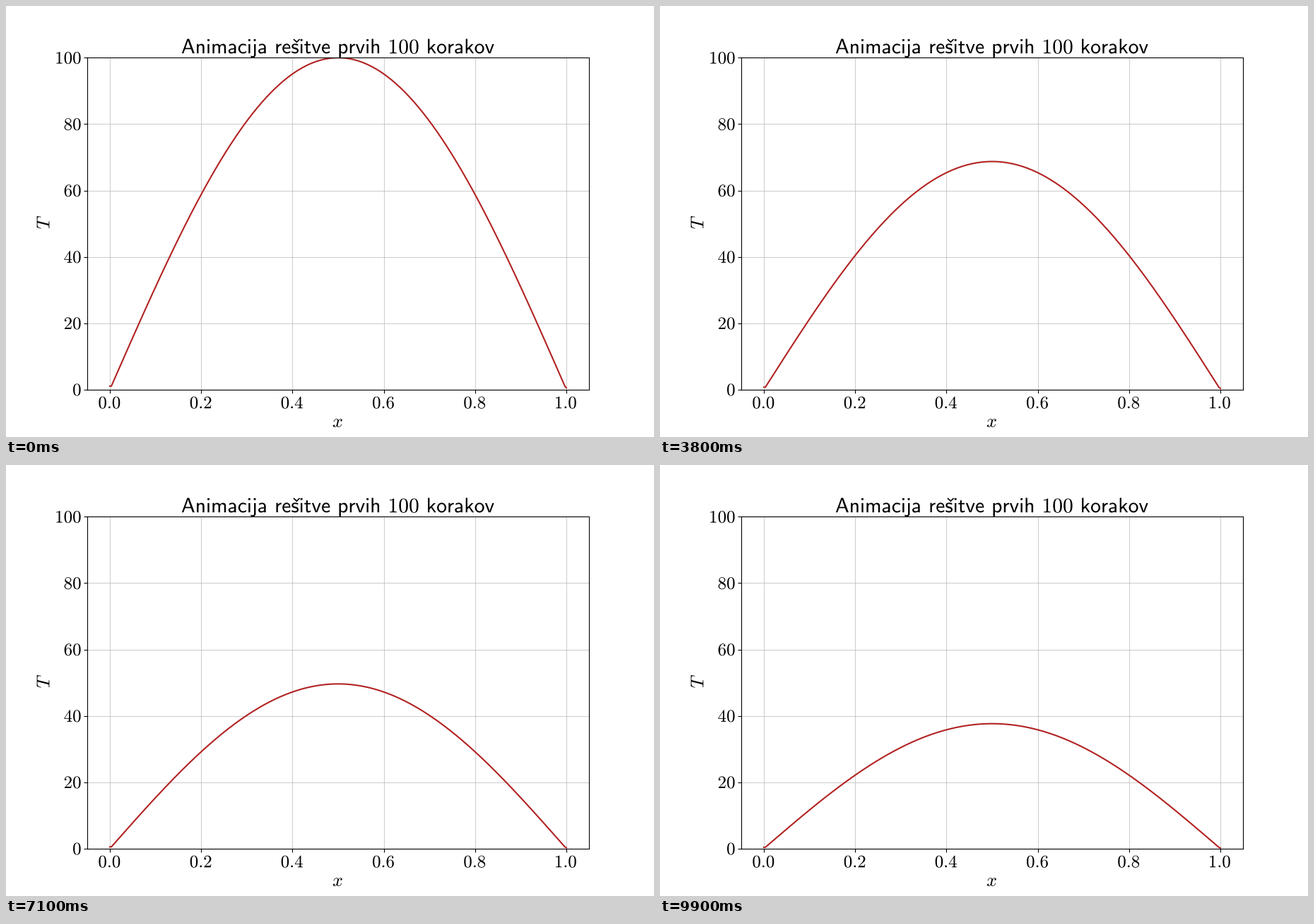
A matplotlib script for the animation above (10 s loop, 917 by 611 pixels).

```python
import numpy as np
import matplotlib.pyplot as plt
from matplotlib.animation import FuncAnimation
from matplotlib.lines import Line2D
from matplotlib.patches import PathPatch
from matplotlib.textpath import TextPath
from matplotlib.transforms import Affine2D

W, H, DPI = 917, 611, 100
FRAMES, INTERVAL = 100, 100
DIFFUSION = 0.001  # diffusivity times one time step

plt.rcParams["mathtext.fontset"] = "cm"

fig = plt.figure(figsize=(W / DPI, H / DPI), dpi=DPI, facecolor="white")
ax = fig.add_axes([0.125, 0.11, 0.775, 0.77])
ax.set_xlim(-0.05, 1.05)
ax.set_ylim(0, 100)
ax.set_xticks(np.arange(6) / 5)
ax.set_yticks(np.arange(0, 101, 20))
ax.tick_params(labelbottom=False, labelleft=False)
ax.grid(True, alpha=0.6)
ax.set_axisbelow(True)

# Pixel coordinates with y pointing down
px = Affine2D().scale(1 / W, -1 / H).translate(0, 1) + fig.transFigure


def label(tex, size, x, y, align="origin", rotate=0):
    """Draw mathtext outlines; y is the baseline unless align is 'middle'."""
    path = TextPath((0, 0), f"${tex}$", size=size)
    path = path.transformed(Affine2D().rotate_deg(rotate).scale(1, -1))
    box = path.get_extents()
    dx = {"origin": 0, "right": box.x1}.get(align, (box.x0 + box.x1) / 2)
    dy = (box.y0 + box.y1) / 2 if align == "middle" else 0
    path = path.transformed(Affine2D().translate(x - dx, y - dy))
    fig.add_artist(PathPatch(path, fc="black", lw=0, transform=px))


def to_px(x, y):
    u, v = ax.transData.transform((x, y))
    return u, H - v


for t in ax.get_xticks():
    label(f"{t:.1f}", 25, to_px(t, 0)[0] - 0.6, 570.4, "center")
for t in ax.get_yticks():
    label(f"{t:.0f}", 25, 105.6, to_px(0, t)[1] + 8.4, "right")

label("x", 26, 469.3, 597, "center")
label("T", 26, 52.5, 306.8, "middle", rotate=90)

# Title, word by word, with the caron drawn over the s
TITLE = [("Animacija", 248), ("resitve", 380.1), ("prvih", 469.1),
         ("100", 540.4), ("korakov", 594.7)]
for word, x in TITLE:
    label(rf"\mathsf{{{word}}}", 29.6, x, 67.3)
fig.add_artist(Line2D([407.6, 411.3, 415], [47.6, 51.2, 47.6], color="black",
                      lw=1.2, solid_joinstyle="miter", transform=px))

x = np.linspace(0, 1, 301)
line, = ax.plot([], [], color="firebrick", lw=1.5)


def temperature(step):
    T = 100 * np.exp(-np.pi**2 * DIFFUSION * step) * np.sin(np.pi * x)
    T[0] = T[1]
    T[-1] = T[-2] / 2
    return T


def update(step):
    line.set_data(x, temperature(step))
    return line,


anim = FuncAnimation(fig, update, frames=FRAMES, interval=INTERVAL,
                     repeat=True, repeat_delay=0)
plt.show()
```
